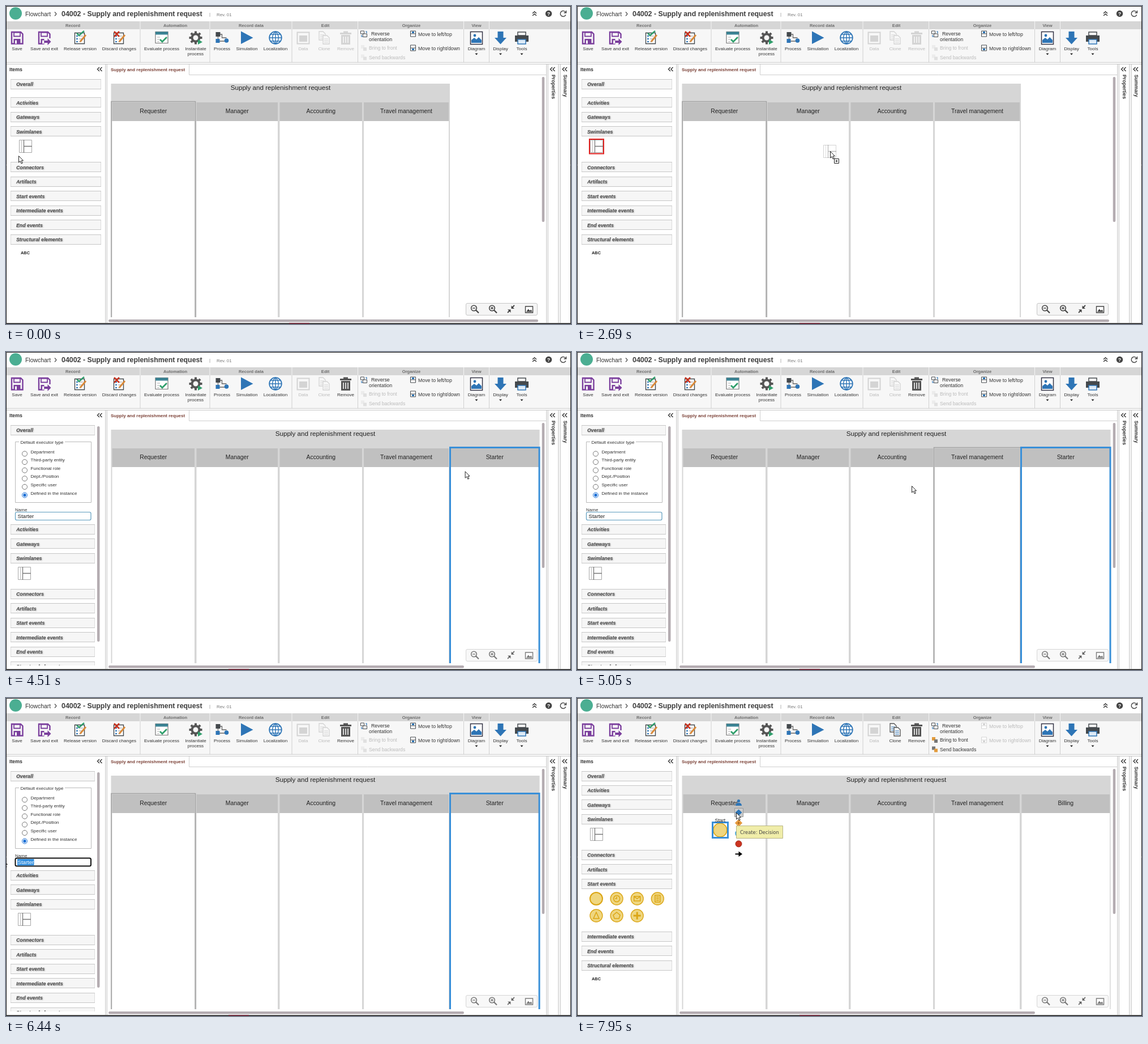
Animation of 998x561 px, one loop 8 s. Source, as an HTML page with a canvas:

```html
<!DOCTYPE html>
<html lang="en">
<head>
<meta charset="utf-8">
<title>Flowchart editor</title>
<style>
html, body { margin: 0; width: 100%; height: 100%; overflow: hidden; background: #fff; }
canvas { display: block; }
</style>
</head>
<body>
<canvas id="stage" width="998" height="561"></canvas>
<script>
const ctx = document.getElementById('stage').getContext('2d');
const LOOP = 8000, DROP = 4510, START_EVENT = 6960;
const TITLE = 'Supply and replenishment request';
const BLUE = '#2e75b6', DARK = '#44494d', PURPLE = '#7b3f9d', GREEN = '#2f9e6b', OFF = '#d4d4d4';
const YELLOW = '#efd67f', GOLD = '#dba514', BAR = '#b4acb1', SELECT = '#398fd8';

// Drawing helpers
function shape(d, fill, stroke, width = 1) {
  const path = new Path2D(d);
  if (fill) { ctx.fillStyle = fill; ctx.fill(path); }
  if (stroke) { ctx.strokeStyle = stroke; ctx.lineWidth = width; ctx.stroke(path); }
}
const rect = (x, y, w, h, ...paint) => shape(`M${x} ${y}h${w}v${h}h${-w}z`, ...paint);
const circle = (x, y, r, ...paint) =>
  shape(`M${x - r} ${y}a${r} ${r} 0 1 0 ${2 * r} 0a${r} ${r} 0 1 0 ${-2 * r} 0z`, ...paint);
const line = (d, color, width) => shape(d, null, color, width);
function pill(x, y, w, h, ...paint) {
  const r = Math.min(w, h, 5) / 2;
  shape(`M${x + r} ${y}h${w - 2 * r}a${r} ${r} 0 0 1 ${r} ${r}v${h - 2 * r}a${r} ${r} 0 0 1 ${-r} ${r}h${2 * r - w}a${r} ${r} 0 0 1 ${-r} ${-r}v${2 * r - h}a${r} ${r} 0 0 1 ${r} ${-r}z`, ...paint);
}
function text(string, x, y, size, color = '#333', style = '', align = 'left', family = 'Liberation Sans') {
  ctx.font = `${style} ${size}px "${family}", Arial, sans-serif`;
  ctx.fillStyle = color;
  ctx.textAlign = align;
  ctx.fillText(string, x, y);
}
const centered = (string, x, y, size, color, style) => text(string, x, y, size, color, style, 'center');
function at(x, y, draw, alpha = 1) {
  ctx.save();
  ctx.translate(x, y);
  ctx.globalAlpha *= alpha;
  draw();
  ctx.restore();
}

// Toolbar icons, centred on the origin
function floppy() {
  shape('M-9.500-10h16l3.500 3.500v17h-19.500z', '#f7f7f7', PURPLE, 2.4);
  rect(-5.5, -9.5, 11, 7, null, PURPLE, 1.8);
  rect(-6, 2, 12, 9, PURPLE);
  rect(-3.5, 4.5, 3, 6, '#f7f7f7');
}
function floppyExit() {
  floppy();
  rect(0, 1, 12, 11, '#f7f7f7');
  shape('M0 5h6v-4l6 6-6 6v-4h-6z', PURPLE);
}
function note(mark, color) {
  rect(-9.5, -8.5, 17, 19, '#fff', DARK, 1.4);
  line('M-7-3h3M-7 2h3M-7 7h3', BLUE, 2);
  line('M-2-3h7M-2 2h6M-2 7h4', '#999', 1.2);
  line('M10-5L0 7', '#d98a3a', 3);
  line(mark, color, 2.6);
}
const approve = () => note('M-6-8l4 4 9-8', GREEN);
const discard = () => note('M-9-11l9 9M0-11l-9 9', '#c8321e');
function evaluate() {
  rect(-11, -10.5, 22, 20, '#fff', '#777', 1.2);
  rect(-11, -10.5, 22, 5, '#3a8394');
  line('M-8-1h5M-8 3h4M-8 7h4', '#aaa', 1.2);
  line('M-3 3l4 4 8-8', GREEN, 2.8);
}
function gear() {
  circle(0, 0, 6.5, null, '#555', 4);
  for (let i = 0; i < 8; i++) at(0, 0, () => { ctx.rotate(i * Math.PI / 4); rect(-2, -11.5, 4, 4, '#555'); });
  shape('M4 3l8 4.5-8 4.5z', GREEN);
}
function processFlow() {
  line('M-7-6V6H5M-7-6h7v6h8', '#666', 1.3);
  rect(-11, -10, 8, 8, DARK);
  rect(-11, 2, 7, 7, BLUE);
  circle(8, 5, 3.8, BLUE);
}
const play = () => shape('M-10.500-11.500L11 0-10.500 11z', BLUE);
function globe() {
  circle(0, 0, 10.8, '#fff', BLUE, 1.8);
  line('M0-11V11M-11 0H11M-9-6H9M-9 6H9M0-11C-7-5-7 5 0 11M0-11C7-5 7 5 0 11', BLUE, 1.4);
}
function dataForm(color) {
  rect(-10.5, -9.5, 21, 20, null, color, 2);
  rect(-7, -4, 14, 11, color);
}
function clone(color) {
  for (const [x, y] of [[-9, -11], [-2, -4]]) {
    shape(`M${x} ${y}h7l4 4v11h-11z`, '#f7f7f7', color, 1.3);
    line(`M${x + 2} ${y + 6}h7m-7 3h7m-7 3h7`, color === OFF ? OFF : BLUE, 1);
  }
}
function trash(color) {
  rect(-10, -9, 20, 3, color);
  rect(-4, -11.5, 8, 3, color);
  shape('M-8-5h16v17h-16z', color);
  line('M-4-2v11M0-2v11M4-2v11', '#f7f7f7', 1.6);
}
function picture() {
  rect(-10.5, -10.5, 21, 22, '#fff', '#334', 1.5);
  circle(-3, -4, 2.4, BLUE);
  shape('M-9 9v-5l5-4 4 3 4-4 5 5v5z', BLUE);
}
const arrowDown = () => shape('M-5-11H5V0h5.500L0 11.500-10.500 0H-5z', BLUE);
function printer() {
  rect(-7, -10, 14, 6, '#fff', DARK, 1.5);
  rect(-12, -4, 24, 11, DARK);
  rect(-7, 3, 14, 8, '#dceaf7', BLUE, 1.5);
}

const TOOLS = [
  [19.5, 'Save', floppy], [67.5, 'Save and exit', floppyExit], [131, 'Release version', approve],
  [200, 'Discard changes', discard], [275, 'Evaluate process', evaluate], [335, 'Instantiate process', gear],
  [381.5, 'Process', processFlow], [425.5, 'Simulation', play], [476, 'Localization', globe],
  [525, 'Data', dataForm, 9], [562, 'Clone', clone, 2], [600, 'Remove', trash, 1],
  [831, 'Diagram', picture], [873.5, 'Display', arrowDown], [911, 'Tools', printer]
];
const GROUPS = [[118, 'Record'], [299, 'Automation'], [433, 'Record data'], [564, 'Edit'], [716, 'Organize'], [831, 'View']];

function drawHeader() {
  circle(17, 13, 11, '#4bae92');
  text('Flowchart', 34, 17.5, 10.4);
  line('M86 10.500l3 3.500-3 3.500', '#555', 1.3);
  text('04002 - ' + TITLE, 98, 18, 12.4, '#3c3c3c', 'bold');
  text('|', 359, 17, 8, '#888');
  text('Rev. 01', 372, 17.5, 7.9, '#777');
  line('M930 13l3.500-3 3.500 3M930 17l3.500-3 3.500 3', '#333', 1.4);
  circle(958.5, 13.5, 5.7, '#444');
  centered('?', 958.5, 17, 9, '#fff', 'bold');
  line('M988.500 11a5 5 0 1 0 .3 4.500M989.500 8v4h-4', '#444', 1.4);
}

function drawToolbar(phase) {
  rect(0, 27, 998, 14, '#d6d6d6');
  rect(0, 41, 998, 58, '#f7f7f7');
  line('M0 99.500H998', '#c9c9c9');
  for (const x of [237, 360, 505, 621.5, 808.5, 853.5]) {
    line(`M${x} 27V41`, '#f4f4f4');
    line(`M${x} 41V99`, '#d0d0d0');
  }
  for (const [x, name] of GROUPS) centered(name, x, 37, 7.6, '#6c6c6c', 'bold');
  for (const [x, name, icon, from = 0] of TOOLS) {
    const on = phase >= from;
    at(x, 56, () => icon(on ? '#555' : OFF));
    const words = name.startsWith('Inst') ? name.split(' ') : [name];
    words.forEach((word, i) => centered(word, x, 78 + 9 * i, 8.1, on ? '#333' : '#bbb'));
    if (x > 800) shape(`M${x - 2.5} 83.500h5l-2.500 3z`, '#222');
  }
  const order = phase === 2, move = phase < 2, ink = on => on ? '#333' : '#bbb';
  at(632, 49, () => {
    rect(-5.5, -5, 6, 5, '#fff', DARK);
    rect(-1.5, 0, 7, 5.5, '#fff', DARK);
    line('M3-4h2v3M-4 2v3h2', BLUE, 1.2);
  });
  text('Reverse', 645, 52, 8.8);
  text('orientation', 641, 62, 8.8);
  [['Bring to front', 74], ['Send backwards', 90.5]].forEach(([name, y], i) => {
    at(632, y, () => {
      rect(-5, -5, 6, 6, order ? (i ? '#777' : '#e29b3c') : '#ececec');
      rect(-1, -1, 6, 6, order ? (i ? '#e29b3c' : '#777') : '#e0e0e0');
    });
    text(name, 641, y + 3, 8.7, ink(order));
  });
  [['Move to left/top', 49], ['Move to right/down', 74]].forEach(([name, y], i) => {
    at(719, y, () => {
      const color = move ? DARK : OFF;
      rect(-4.5, -5, 9, 10, '#fff', color);
      line('M-4.500 0h9', color);
      rect(-2, i ? 1 : -4, 4, 3, move ? BLUE : OFF);
    });
    text(name, 728, y + 3.5, 8.75, ink(move));
  });
}

function drawFrame() {
  line('M0 102.500H998', '#c4c4c4');
  for (const [x, w] of [[175, 3], [954, 3], [975, 4]]) {
    rect(x, 103, w, 456, '#f1f1f1');
    line(`M${x + .5} 103V559M${x + w + .5} 103V559`, '#cfcfcf');
  }
  line('M323.500 103V121.500H954', '#cfcfcf');
  text('Items', 6, 114.5, 8.8, '#333', 'bold');
  text(TITLE, 185, 114.5, 8, '#7b4036', 'bold');
  for (const x of [165.5, 965.5, 987]) line(`M${x - .5} 108l-3.500 3.500 3.500 3.500m4.500-7l-3.500 3.500 3.500 3.500`, '#333', 1.4);
  for (const [x, name] of [[963.5, 'Properties'], [985, 'Summary']])
    at(x, 121, () => { ctx.rotate(Math.PI / 2); text(name, 0, 0, 8.7, '#333', 'bold'); });
}

// Left panel
const SECTIONS = ['Overall', 'Activities', 'Gateways', 'Swimlanes', 'Connectors', 'Artifacts',
  'Start events', 'Intermediate events', 'End events', 'Structural elements'];
const SECTION_Y = [
  [138, 170.5, 196, 221.5, 284.5, 310, 335.5, 361, 386.5, 412],
  [138, 313, 338.5, 364, 427, 452.5, 478, 503.5, 529, 555],
  [138, 163, 188.5, 214, 277, 302.5, 328, 421, 446.5, 472]
];
const EXECUTORS = ['Department', 'Third-party entity', 'Functional role', 'Dept./Position', 'Specific user', 'Defined in the instance'];

function section(name, y, width) {
  const top = Math.floor(y) - 8.5;
  rect(8.5, top, width, 17, '#f6f6f6', '#dcdcdc');
  line(`M8 ${top}h${width + 1}m0 17h${-width - 1}`, '#c6c6c6');
  ctx.shadowColor = '#aaa';
  ctx.shadowBlur = 2;
  ctx.shadowOffsetX = ctx.shadowOffsetY = 1;
  text(name, 18, y + 3, 8.8, '#4c4c4c', 'italic bold');
  ctx.shadowColor = 'transparent';
}
function swimlaneIcon() {
  rect(.5, .5, 22, 22, '#fff', '#a8a8a8');
  line('M4.500 0V23', '#bbb');
  line('M8.500 0V23M8.500 11.500H23', '#777', 1.3);
}
const EVENT_MARKS = ['', 'M0-5.500a5.500 5.500 0 1 0 .1 0M0-3.500V0H-3', 'M-5.500-4h11v8h-11zl5.500 4 5.500-4',
  'M-4.500-6h9v12h-9zM-2.500-3h5M-2.500 0h5M-2.500 3h5', 'M0-6L5 5H-5z', 'M0-6L6-1 4 5H-4L-6-1z', 'M0-6.500V6.500M-6.500 0H6.500'];

function drawExecutorForm(t, x) {
  rect(16.5, 158.5, 134, 107, null, '#b9b9b9');
  rect(23, 154, 81, 9, '#fff');
  text('Default executor type', 25.5, 161.5, 8.05);
  EXECUTORS.forEach((name, i) => {
    const y = 179.5 + 14.6 * i, on = i === 5;
    circle(33, y, 4.5, '#fff', on ? '#1a6fd6' : '#777');
    if (on) circle(33, y, 2.7, '#1a6fd6');
    text(name, 43.5, y - 1, 8.05);
  });
  text('Name', 16, 280.5, 8.05);
  const focused = t >= 5800;
  pill(16.5, 282.5, 133.5, 14, '#fff', focused ? '#111' : '#5b9bbd', focused ? 2 : 1.2);
  const name = t < 6700 ? 'Starter' : 'Billing';
  text(name, 20.5, 293, 9.6, '#222');
  const from = Math.max(20, x);
  if (focused && t < 6700 && from < 49.5) {
    ctx.save();
    rect(from, 284, 49.5 - from, 11.5, '#3390e0');
    ctx.beginPath();
    ctx.rect(from, 284, 30, 12);
    ctx.clip();
    text(name, 20.5, 293, 9.6, '#fff');
    ctx.restore();
  }
}

function drawPanel(t, phase, x) {
  const ys = SECTION_Y[phase];
  ctx.save();
  ctx.beginPath();
  ctx.rect(0, 103, 174, 450);
  ctx.clip();
  SECTIONS.forEach((name, i) => section(name, ys[i], phase === 1 ? 148 : 159));
  at(phase === 1 ? 21 : 23, Math.round(ys[3] + 14.5), swimlaneIcon);
  if (phase === 1) {
    drawExecutorForm(t, x);
    pill(161, 131, 4.5, 380, BAR);
  } else {
    text('ABC', 26, ys[9] + 26, 7.4, '#222', 'bold');
  }
  if (phase === 0 && t >= 1700) at(0, 0, () => rect(22, 235, 25, 25.5, null, '#e3201f', 2), Math.min(1, (t - 1640) / 250));
  if (phase === 2) EVENT_MARKS.forEach((mark, i) => at(34 + 36.1 * (i % 4), i < 4 ? 354 : 384, () => {
    circle(0, 0, 11, YELLOW, GOLD, i ? 1.3 : 2);
    if (mark) line(mark, GOLD, i === 6 ? 3 : 1.5);
  }));
  ctx.restore();
}

// Diagram
const LANES = [['Requester', 187.5, 333], ['Manager', 336.5, 480], ['Accounting', 483.5, 629],
  ['Travel management', 632, 782], ['Starter', 785.5, 941]];
const laneAt = x => LANES.findIndex(lane => x < lane[2] + 1.5);

function hoveredLane(t, phase) {
  if (phase === 0) return 0;
  if (phase === 2) return t < 7710 ? 0 : -1;
  return t < 5350 ? laneAt(pointer(t - 70)[0]) : t < 6700 ? 0 : -1;
}

function drawDiagram(t, phase) {
  const right = phase ? 942.5 : 784, lanes = LANES.slice(0, phase ? 5 : 4);
  rect(185.5, 137, right - 185.5, 412, '#d6d6d6');
  centered(TITLE, phase ? 564 : 485, 148, 11.65, '#222');
  for (const [name, x0, x1] of lanes) {
    rect(x0, 170, x1 - x0, 33, '#c0c0c0');
    rect(x0, 203, x1 - x0, 346, '#fff');
    centered(name === 'Starter' && t >= 6760 ? 'Billing' : name, (x0 + x1) / 2, 189, 10.4, '#222');
  }
  const hover = lanes[hoveredLane(t, phase)];
  if (hover && hover[0] !== 'Starter') line(`M${hover[1] - 1.5} 549V168.500H${hover[2] + 1.5}V549`, '#a2a2a2', 1.6);
  if (phase === 1) line('M784.500 549V168.500H942V549', SELECT, 3);
  pill(181, 553, phase ? 628 : 759, 4.5, BAR);
  pill(946.7, 125, 4.5, 256, BAR);
}

function drawZoomBar(phase) {
  at(0, 0, () => {
    pill(812.5, 524.5, 126, 21, '#f5f5f5', '#c6c6c6');
    for (const x of [827, 859]) {
      circle(x - .5, 533, 4.8, null, '#444', 1.6);
      line(`M${x + 3} 536.500l5 5`, '#444', 2.2);
      line(`M${x - 3} 533h5` + (x > 840 ? 'm-2.500-2.500v5' : ''), '#444', 1.3);
    }
    line('M898 528l-4.500 4.500M886 541l4.500-4.500', '#444', 1.8);
    shape('M892.500 528.500v5.500h5.500zM891.500 541v-5.500h-5.500z', '#444');
    rect(917.5, 530, 13, 11, '#fff', '#444', 1.4);
    shape('M919 539.500l3.500-5 3 3 2-2 2 4z', '#444');
  }, phase ? .7 : 1);
}

function drawStartEvent(t) {
  circle(252.8, 233, 12, YELLOW, GOLD, 1.6);
  rect(239.5, 219.5, 27, 27, null, SELECT, 3);
  centered('Start', 252.8, 219, 8.8, '#222');
  if (t < 7710) return;
  circle(285.5, 181.5, 2.6, BLUE);
  shape('M280 190c0-7 11-7 11 0z', BLUE);
  rect(278.5, 194.5, 15, 15, '#ccc', '#999');
  shape('M285.500 196.500l6 5.500-6 5.500-6-5.500z', BLUE);
  shape('M285.500 214.500l6 6-6 6-6-6z', '#f0a64b', '#d48425');
  line('M285.500 217.500v6M282.500 220.500h6', '#a35d10', 1.2);
  circle(285.5, 239, 5.5, '#fff', '#35a3d8', 1.5);
  circle(285.5, 257.3, 5.5, '#cc3420', '#9e2415');
  line('M279.500 275.300h7', '#000', 2);
  shape('M285.500 270.500l6.500 4.800-6.500 4.800z', '#000');
  if (t < 7890) return;
  rect(281.5, 225.5, 82, 22, '#f0eda9', '#b9b586');
  text('Create: Decision', 288, 240, 8.35, '#444', '', 'left', 'DejaVu Sans');
}

// Pointer: time, x, y, joined by smooth curves
const TRACK = [
  [0, 22, 264], [1260, 22, 264], [1320, 26, 261], [1500, 41, 246], [2150, 41, 246], [2690, 447, 256],
  [2990, 634, 256], [3350, 788, 223], [3650, 813, 210], [4450, 813, 210], [5050, 591, 236],
  [5290, 217, 284], [5800, 52, 286], [6130, 12, 285], [6440, -6, 285], [6950, -6, 285],
  [6960, 150, 300], [7450, 253, 233], [7650, 253, 233], [7950, 281, 202], [8000, 281, 202]
];
function slope(i, axis) {
  const before = TRACK[i - 1], here = TRACK[i], after = TRACK[i + 1];
  if (!before || !after || before[axis] === here[axis] || after[axis] === here[axis]) return 0;
  return (after[axis] - before[axis]) / (after[0] - before[0]);
}
function pointer(t) {
  const first = [0, 2210, DROP, 7710].findLast(start => start <= t);
  t = first + Math.floor((t - first) / 60) * 60;
  const i = TRACK.findLastIndex(key => key[0] <= t), a = TRACK[i], b = TRACK[i + 1];
  const span = b[0] - a[0], s = (t - a[0]) / span, ease = s * s * (3 - 2 * s);
  return [1, 2].map(axis => a[axis] + (b[axis] - a[axis]) * ease
    + span * s * (1 - s) * ((1 - s) * slope(i, axis) - s * slope(i + 1, axis)));
}

function drawPointer(t, phase, [x, y]) {
  const dragging = t >= 2210 && t < DROP;
  if (dragging) at(x - 12, y - 11, swimlaneIcon, .5);
  at(x, y, () => {
    if (phase === 1 && t >= 5290 && x > 16 && x < 150) {
      line('M-2-5h4M0-5V6M-2 6h4', '#222');
      return;
    }
    shape('M.500.500V12l2.700-2.500 2 4.500 2-.9-2-4.300H8.500z', '#fff', '#222');
    if (dragging) {
      rect(7.5, 13.5, 8, 8, '#fff', '#222');
      line('M11.500 15.500v4M9.500 17.500h4', '#222');
    }
  });
}

function draw(t) {
  const phase = t < DROP ? 0 : t < START_EVENT ? 1 : 2, position = pointer(t);
  rect(0, 0, 998, 561, '#fff');
  drawHeader();
  drawToolbar(phase);
  drawFrame();
  drawPanel(t, phase, position[0]);
  drawDiagram(t, phase);
  drawZoomBar(phase);
  if (phase === 2) drawStartEvent(t);
  drawPointer(t, phase, position);
  rect(.5, .5, 997, 560, null, '#161616');
  line('M1 559.500H997', '#808080');
  rect(t < 60 ? 500 : t < 1700 ? 358 : 393, 559, 36, 2, '#6d2c3c');
}

const began = performance.now();
function tick() {
  draw((performance.now() - began) % LOOP);
  requestAnimationFrame(tick);
}
tick();
</script>
</body>
</html>
```
